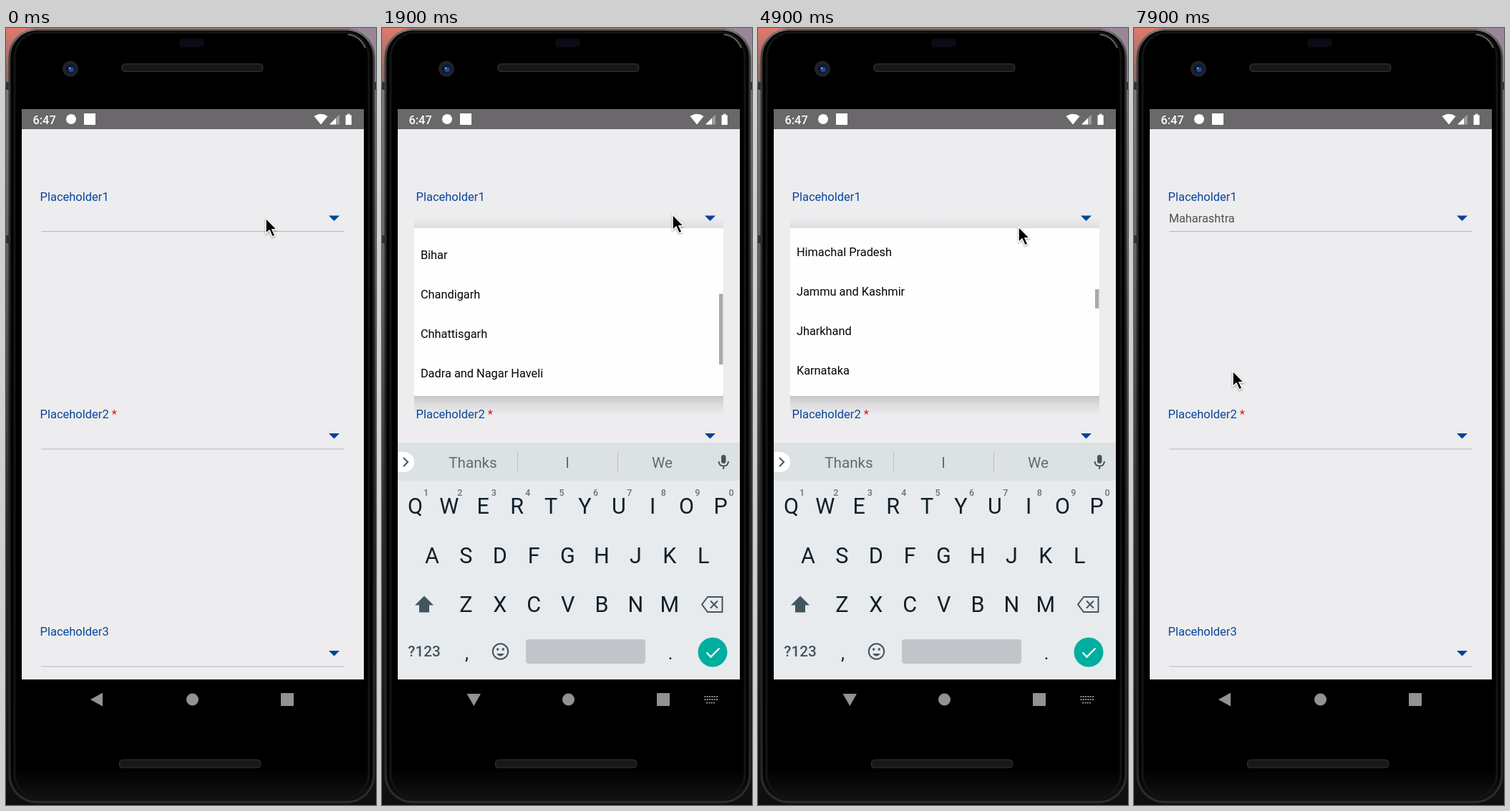
An HTML page that plays this animation: 517 px wide and 1083 px high, repeating every 8000 ms.

```html
<!DOCTYPE html>
<html lang="en">
<head>
<meta charset="utf-8">
<title>Dropdown selection</title>
<style>
html, body { margin: 0; width: 100%; height: 100%; overflow: hidden; background: #000; }
svg { display: block; width: 100%; height: 100%; }
text { font-family: Roboto, sans-serif; font-size: 16.35px; white-space: pre; }
.label { font-size: 16.5px; fill: #08479b; }
.key { font-size: 30.5px; fill: #101f29; text-anchor: middle; }
.hint { font-size: 12.5px; font-weight: 500; fill: #66727a; text-anchor: middle; }
.word { font-size: 20.7px; fill: #5d6b73; text-anchor: middle; }
.icon { fill: none; stroke: #43555f; stroke-width: 2; }
</style>
</head>
<body>
<svg viewBox="0 0 517 1083" preserveAspectRatio="none">
  <defs>
    <linearGradient id="desk" x2="0" y2="1">
      <stop stop-color="#e0796c"/><stop offset=".06" stop-color="#8a6a66"/>
      <stop offset=".08" stop-color="#777"/><stop offset=".27" stop-color="#666"/>
      <stop offset=".65" stop-color="#2a2a2a"/><stop offset="1" stop-color="#100d0f"/>
    </linearGradient>
    <linearGradient id="rim" x2="0" y2="1">
      <stop stop-color="#777"/><stop offset=".04" stop-color="#3a3a3a"/>
      <stop offset=".5" stop-color="#1c1c1c"/><stop offset="1" stop-color="#2c2c2c"/>
    </linearGradient>
    <linearGradient id="chin" x2="0" y2="1">
      <stop stop-color="#000"/><stop offset=".955" stop-color="#000"/><stop offset="1" stop-color="#131313"/>
    </linearGradient>
    <linearGradient id="above" x2="0" y2="1">
      <stop stop-opacity="0"/><stop offset="1" stop-opacity=".06"/>
    </linearGradient>
    <linearGradient id="below" x2="0" y2="1">
      <stop stop-opacity=".18"/><stop offset=".4" stop-opacity=".08"/><stop offset="1" stop-opacity="0"/>
    </linearGradient>
    <linearGradient id="fade" x2="0" y2="1">
      <stop stop-color="#fff" stop-opacity=".4"/><stop offset="1" stop-color="#fff" stop-opacity="0"/>
    </linearGradient>
    <clipPath id="screenClip"><rect x="22" y="113" width="478" height="795"/></clipPath>
    <clipPath id="listClip"><rect x="45" y="279" width="432" height="234"/></clipPath>
  </defs>

  <!-- Phone -->
  <rect width="517" height="1083" fill="url(#desk)"/>
  <path d="M470 0H517V75H511Q512 15 470 0" fill="#9b8798"/>
  <path d="M0 75H7V86H0M510 75H517V86H510M0 289H7V300H0" fill="#303030"/>
  <rect x="5" y="2" width="509" height="1077" rx="38" fill="url(#chin)" stroke="url(#rim)" stroke-width="3"/>
  <rect x="12" y="6" width="495" height="1068" rx="34" fill="none" stroke="#141414" stroke-width="3"/>
  <path d="M38 2.500H480" stroke="#555" stroke-width="1.500"/>
  <path d="M478 9Q495 11 502 28" fill="none" stroke="#777" stroke-width="1.500"/>
  <rect x="242" y="15" width="35" height="12" rx="5" fill="#0a0b16"/>
  <g fill="#191717" stroke="#3c3636">
    <rect x="162" y="50" width="197" height="10.500" rx="4"/>
    <rect x="158.500" y="1020" width="197" height="11" rx="4"/>
  </g>
  <circle cx="90" cy="57" r="11" fill="#202227"/>
  <circle cx="90" cy="57" r="7" fill="#0d1a38"/>
  <circle cx="91" cy="58" r="3.500" fill="#234b93"/>
  <circle cx="89" cy="56" r="1.200" fill="#8db4e8"/>

  <g clip-path="url(#screenClip)">
    <rect x="22" y="113" width="478" height="795" fill="#edecee"/>
    <g id="fields"></g>
    <text id="value" x="48.700" y="271" fill="#505052">Maharashtra</text>
    <path id="caret" d="M50.500 253V276" stroke="#0b8174" stroke-width="2"/>

    <g id="dropdown">
      <rect x="45" y="263" width="432" height="16" fill="url(#above)"/>
      <rect x="45" y="512" width="432" height="28" fill="url(#below)"/>
      <rect x="45" y="279" width="432" height="234" rx="2" fill="#fefefe"/>
      <g clip-path="url(#listClip)"><g id="items"></g></g>
      <rect id="topFade" x="45" y="279" width="420" height="26" fill="url(#fade)"/>
      <rect id="bar" x="471" width="5.500" fill="#aaa9aa"/>
    </g>

    <g id="keyboard">
      <rect x="22" y="578" width="478" height="330" fill="#e7ebee"/>
      <rect x="22" y="578" width="478" height="53" fill="#dce1e4"/>
      <path d="M22 591H31A14 14 0 0 1 31 619H22" fill="#fff"/>
      <path d="M30 599L36 605L30 611" class="icon" stroke-width="2.500"/>
      <path d="M189.500 591V619M329.500 591V619" stroke="#b9c1c5"/>
      <rect x="474" y="595" width="6.500" height="12" rx="3.200" fill="#43555f"/>
      <path d="M470.500 604Q471 610.500 477.300 610.500T484 604M477.300 611V615" class="icon"/>
      <g id="keys"></g>
      <path d="M59 791.500L72 804.500H66V814.500H52V804.500H46Z" fill="#43555f"/>
      <path d="M447 803.500L455 793H475.500V814H455ZM459 798.500L469 808.500M469 798.500L459 808.500" class="icon"/>
      <circle cx="165.500" cy="869" r="10.700" class="icon"/>
      <path d="M160 872Q165.500 879 171 872Z" fill="#43555f"/>
      <circle cx="161.700" cy="866" r="1.700" fill="#43555f"/>
      <circle cx="169.300" cy="866" r="1.700" fill="#43555f"/>
      <rect x="201" y="852" width="167" height="34" rx="4" fill="#c1c5c9"/>
      <circle cx="462" cy="870" r="20.500" fill="#00ae9f"/>
      <path d="M453.500 870.500L459.500 876.500L471.500 864.500" fill="none" stroke="#fff" stroke-width="2.300"/>
    </g>

    <!-- Status bar -->
    <rect x="22" y="113" width="478" height="28" fill="#6a686a"/>
    <g fill="#fff">
      <text x="37.500" y="133.500" font-weight="500">6:47</text>
      <circle cx="91" cy="127" r="7"/>
      <rect x="109" y="119" width="16" height="16"/>
      <path d="M430.500 123Q440 116.500 449.500 123L440 134.500Z"/>
      <path d="M452 134.500L466 120.500V134.500Z" opacity=".35"/>
      <path d="M452 134.500L461 125.500V134.500Z"/>
      <path d="M474.500 121.500H476.800V119.800H480.500V121.500H482.800V135H474.500Z"/>
    </g>
  </g>

  <!-- Navigation -->
  <g fill="#929292">
    <path id="back"/>
    <circle cx="260.500" cy="936" r="8.500"/>
    <rect x="384" y="927" width="18" height="18" rx="1"/>
    <path id="imeIcon" d="M450.500 932H469M450.500 936H469M453 940.500H466" stroke="#929292" stroke-width="2" stroke-dasharray="2 1.300"/>
  </g>

  <path id="cursor" d="M0 0V21.500L5 17L9 26L13 24.300L9 15.800H15.500Z" stroke="#fff" stroke-width="1.500"
    style="filter:drop-shadow(0 1px 1px #0006)"/>
</svg>

<script>
const LOOP = 8000, ROW = 55.1, VIEW = 234;
const OPEN = 130, CLOSE = 7050;
const states = ['Andaman and Nicobar Islands', 'Andhra Pradesh', 'Arunachal Pradesh', 'Assam', 'Bihar',
  'Chandigarh', 'Chhattisgarh', 'Dadra and Nagar Haveli', 'Daman and Diu', 'Delhi', 'Goa', 'Gujarat',
  'Haryana', 'Himachal Pradesh', 'Jammu and Kashmir', 'Jharkhand', 'Karnataka', 'Kerala', 'Lakshadweep',
  'Madhya Pradesh', 'Maharashtra', 'Manipur', 'Meghalaya'];

// time, pointer x, pointer y, list scroll
const poses = [
  [0, 363, 265, 0], [500, 363, 265, 0], [1100, 405, 470, 0], [1250, 405, 470, 0],
  [1850, 406, 260, 213.4], [2100, 406, 260, 213.4], [2500, 380, 440, 213.4], [2650, 380, 440, 213.4],
  [3100, 370, 268, 384.7], [3200, 370, 268, 384.7], [3500, 365, 432, 384.7], [3750, 365, 432, 384.7],
  [4200, 364, 277, 600], [4700, 364, 277, 713.5], [4950, 364, 277, 713.5], [5250, 345, 450, 713.5],
  [5350, 345, 450, 713.5], [5950, 341, 265, 895.7], [6050, 341, 265, 895.7], [6250, 320, 300, 928],
  [6800, 138, 478, 933], [LOOP, 138, 478, 933]
];

const $ = id => document.getElementById(id);
const clamp = v => Math.max(0, Math.min(1, v));
const smooth = v => v * v * (3 - 2 * v);
const show = (id, on) => $(id).setAttribute('visibility', on ? 'visible' : 'hidden');
const move = (id, x, y) => $(id).setAttribute('transform', `translate(${x} ${y})`);
const text = (x, y, cls, s, extra = '') => `<text x="${x}" y="${y}" class="${cls}" ${extra}>${s}</text>`;
const keyRow = (letters, x, y) => [...letters].map((c, i) => text(x + i * 47.4, y, 'key', c)).join('');

$('fields').innerHTML = [0, 303.4, 606.5].map((y, i) => `<g transform="translate(0 ${y})">
  ${text(47.5, 240.5, 'label', `Placeholder${i + 1}` + (i === 1 ? ' <tspan fill="#e5151d">*</tspan>' : ''))}
  <path d="M451 261.500H466L458.500 269Z" fill="#00439b"/>
  <path d="M49 283.500H473" stroke="#b7b6b8"/></g>`).join('');

$('items').innerHTML = states.map((name, i) =>
  text(53.9, 315 + i * ROW, '', name, `fill="${name === 'Delhi' ? '#c3c3c3' : '#050505'}"`)).join('');

$('keys').innerHTML =
  text(127, 613, 'word', 'Thanks') + text(259, 613, 'word', 'I') + text(391.5, 613, 'word', 'We') +
  keyRow('QWERTYUIOP', 46.4, 677.4) + keyRow('ASDFGHJKL', 69.9, 745.8) + keyRow('ZXCVBNM', 117.4, 814) +
  [...'1234567890'].map((c, i) => text(61.5 + i * 47.4, 652, 'hint', c)).join('') +
  text(59, 876, 'word', '?123', 'font-weight="500" style="fill:#43555f"') +
  text(118.5, 880, 'key', ',', 'style="font-size:25px"') + text(403, 880, 'key', '.', 'style="font-size:25px"');

function poseAt(t) {
  const i = Math.max(1, poses.findIndex(p => p[0] > t));
  const a = poses[i - 1], b = poses[i];
  const k = smooth((t - a[0]) / (b[0] - a[0]));
  return a.map((v, j) => v + (b[j] - v) * k);
}

function draw(t) {
  const [, x, y, scroll] = poseAt(t);
  const keyboard = smooth(clamp((t - OPEN) / 220)) * (1 - smooth(clamp((t - CLOSE) / 220)));
  const list = clamp((t - 230) / 120) * (1 - clamp((t - CLOSE) / 100));
  const loaded = scroll > 318 ? 36 : 10;
  const scale = VIEW / (loaded * ROW);
  const open = t >= OPEN && t < CLOSE;

  move('cursor', x, y);
  move('items', 0, -scroll);
  move('keyboard', 0, 330 * (1 - keyboard));
  $('dropdown').setAttribute('opacity', list);
  $('bar').setAttribute('y', 280 + scroll * scale);
  $('bar').setAttribute('height', VIEW * scale - 1);
  $('back').setAttribute('d', open ? 'M118.500 928H138L128.300 945Z' : 'M118 936L135 926.500V945.500Z');
  show('topFade', scroll > 0);
  show('imeIcon', open);
  show('caret', t >= OPEN && t < 900);
  show('value', t >= CLOSE);
}

function tick() {
  draw(performance.now() % LOOP);
  requestAnimationFrame(tick);
}
tick();
</script>
</body>
</html>
```
